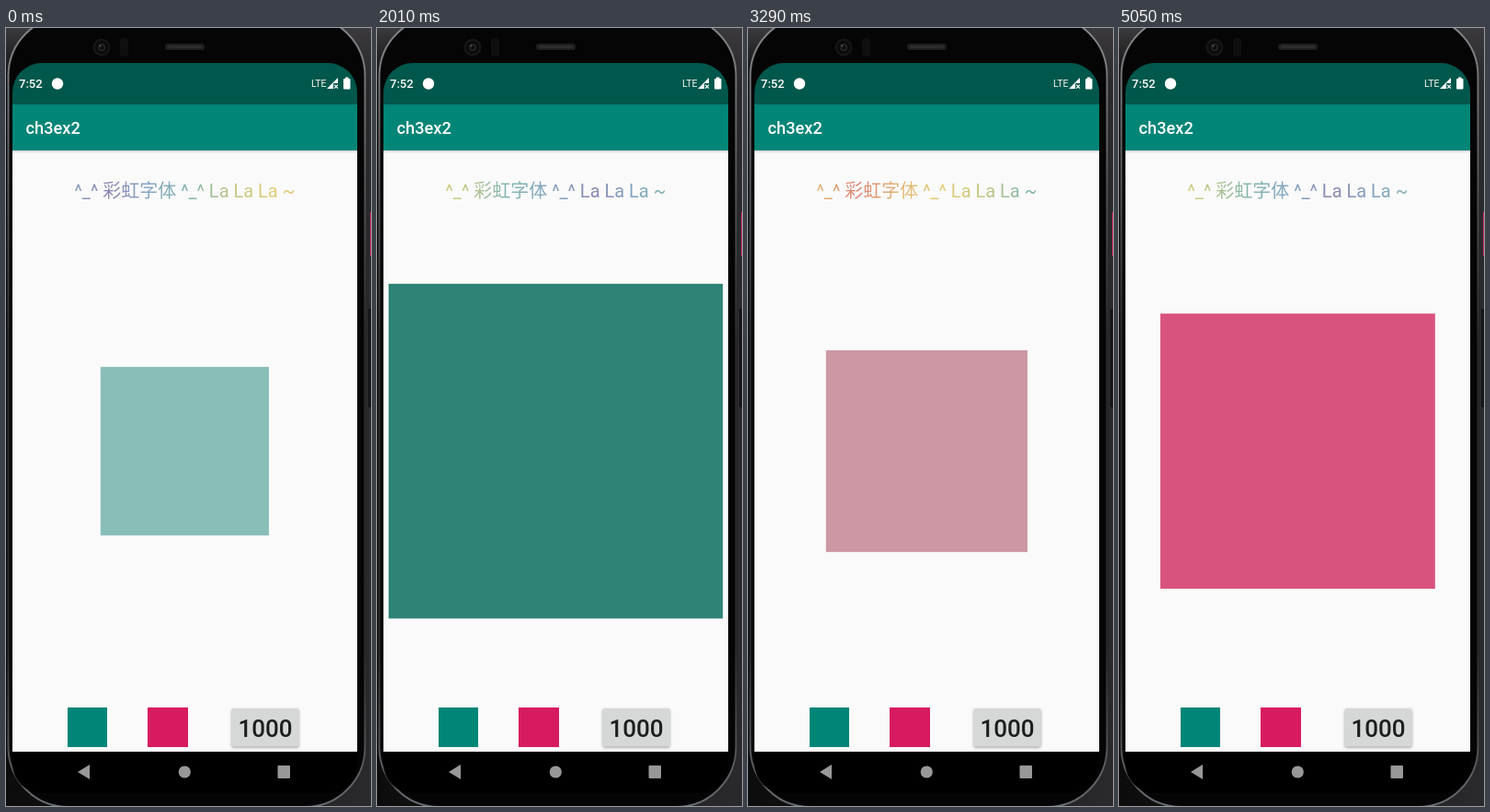
Write an HTML page with a canvas that moves like this. It is 397x845 px and loops after 5090 ms.

```html
<!DOCTYPE html>
<html lang="zh">
<head>
<meta charset="utf-8">
<title>ch3ex2</title>
<style>
html, body { margin: 0; width: 100%; height: 100%; overflow: hidden; background: #1c1b1c; }
canvas { display: block; width: 397px; height: 845px; }
</style>
</head>
<body>
<canvas id="stage" width="397" height="845"></canvas>
<script>
const W = 397, H = 845, LOOP = 5090, STEP = 40;
const GREEN = [0, 133, 119], PINK = [216, 27, 96];
const CENTER = { x: 194.4, y: 459.6 };
const BASE = 91.3;            // half side of the unscaled square
const BAND = 46;              // width of one rainbow colour
const RAINBOW = ['#8c87b2', '#82a4c0', '#82b6ae', '#c2c884', '#e2cc76', '#e4b674', '#de8474'];
const MIRROR = 2 * (RAINBOW.length - 1);

// time, pulse phase, rainbow offset
const KEYS = [
  [0, .033, 110], [800, .4385, 597], [1520, .802, 1033], [2000, 1.06, 1336],
  [2240, 1.176, 1471], [2680, 1.404, 1718], [3370, 1.75, 2102],
  [4080, 2.102, 2498], [5040, 2.588, 2992]
];

const stage = document.getElementById('stage').getContext('2d');
const rgb = c => `rgb(${c.map(Math.round).join(',')})`;
const ease = u => .5 - .5 * Math.cos(Math.PI * u);

function rect(c, color, x, y, w, h) {
  c.fillStyle = color;
  c.fillRect(x, y, w, h);
}

function round(c, color, x, y, w, h, r) {
  c.fillStyle = color;
  c.beginPath();
  c.roundRect(x, y, w, h, r);
  c.fill();
}

function disc(c, color, x, y, r) {
  c.fillStyle = color;
  c.beginPath();
  c.arc(x, y, r, 0, 7);
  c.fill();
}

function poly(c, color, ...pts) {
  c.fillStyle = color;
  c.beginPath();
  pts.forEach(([x, y]) => c.lineTo(x, y));
  c.fill();
}

function cross(c, color, x, y, r, width) {
  c.strokeStyle = color;
  c.lineWidth = width;
  c.beginPath();
  c.moveTo(x - r, y - r); c.lineTo(x + r, y + r);
  c.moveTo(x + r, y - r); c.lineTo(x - r, y + r);
  c.stroke();
}

function label(c, text, x, y, font, color) {
  c.font = font + ' Roboto, sans-serif';
  c.fillStyle = color;
  c.fillText(text, x, y);
}

function fade(c, x0, y0, x1, y1, ...colors) {
  const g = c.createLinearGradient(x0, y0, x1, y1);
  colors.forEach((color, i) => g.addColorStop(i / (colors.length - 1), color));
  return g;
}

function drawBody(c) {
  rect(c, fade(c, 0, 0, W, 0, '#0c0c0d', '#2a292b'), 0, 0, W, H);
  rect(c, fade(c, 0, 0, 0, 60, '#3b393b', 'rgba(59,57,59,0)'), 0, 0, W, 60);
  rect(c, '#141416', 394, 305, 3, 107);
  rect(c, '#cf2a63', 396, 200, 1, 48);
  round(c, '#050506', 1.5, -14, 390, 861, 66);
  c.lineWidth = 2;
  c.strokeStyle = fade(c, 0, 0, 0, H, '#85878a', '#56585b', '#2c2d2f', '#2c2d2f', '#2c2d2f', '#6a6c70');
  c.beginPath();
  c.roundRect(2.5, -13, 388, 859, 65);
  c.stroke();

  disc(c, '#161618', 104, 21, 9.5);
  disc(c, '#0a0a0b', 104, 21, 7);
  disc(c, '#29292b', 104, 21, 4);
  disc(c, '#0c0c0e', 104, 21, 2.5);
  disc(c, '#5c5c60', 102.5, 19.5, 1);
  round(c, '#0f0f10', 124, 11, 9, 20, 3);
  round(c, '#1f1f21', 173, 17, 43, 7, 3.5);
  round(c, '#2d2d2f', 176, 19, 37, 3, 1.5);
}

function drawStatus(c) {
  const bar = '#00574b';
  rect(c, bar, 7, 38, 375, 45);
  label(c, '7:52', 14, 65, '500 13px', '#fff');
  disc(c, '#fff', 56, 60.5, 6.2);
  label(c, 'LTE', 332, 64, '10.5px', '#eef4f3');
  poly(c, '#fff', [349, 66], [361, 54], [361, 66]);
  rect(c, bar, 356, 60, 6, 7);
  cross(c, '#fff', 359, 63.7, 2, 1.2);
  rect(c, '#fff', 369, 53.5, 3.5, 2);
  round(c, '#fff', 367, 55, 7.5, 11.5, 1);
}

function drawScreen(c) {
  c.save();
  c.beginPath();
  c.roundRect(7, 38, 375, 793, 32);
  c.clip();
  rect(c, '#fafafa', 7, 133, 375, 653);
  rect(c, '#000', 7, 786, 375, 45);
  drawStatus(c);
  rect(c, fade(c, 0, 133, 0, 136, 'rgba(0,0,0,.16)', 'rgba(0,0,0,0)'), 7, 133, 375, 3);
  rect(c, rgb(GREEN), 7, 83, 375, 50);
  label(c, 'ch3ex2', 21.5, 115, '500 18.2px', '#fff');

  rect(c, rgb(GREEN), 67, 738, 43, 43);
  rect(c, rgb(PINK), 154, 738, 44, 43);
  c.save();
  c.shadowColor = 'rgba(0,0,0,.35)';
  c.shadowBlur = 3;
  c.shadowOffsetY = 1.2;
  round(c, '#d6d7d7', 245.5, 739, 73, 41.5, 2);
  c.restore();
  c.textAlign = 'center';
  label(c, '1000', 282, 770, '500 26px', '#1c1d1d');

  const gray = '#989898';
  poly(c, gray, [78, 808], [91, 800], [91, 816]);
  disc(c, gray, 194.3, 808, 6.6);
  round(c, gray, 295.5, 801, 13.5, 14, 1);
  c.restore();
}

const backdrop = document.createElement('canvas');
backdrop.width = W;
backdrop.height = H;
drawBody(backdrop.getContext('2d'));
drawScreen(backdrop.getContext('2d'));

function pose(t) {
  let i = 1;
  while (i < KEYS.length - 1 && t > KEYS[i][0]) i++;
  const a = KEYS[i - 1], b = KEYS[i];
  const k = Math.min(1, (t - a[0]) / (b[0] - a[0]));
  return { phase: a[1] + (b[1] - a[1]) * k, shift: a[2] + (b[2] - a[2]) * k };
}

// Colours blend in linear light.
function blend(a, b, k) {
  return a.map((v, i) => (v ** 2.2 * (1 - k) + b[i] ** 2.2 * k) ** (1 / 2.2));
}

function drawSquare(phase) {
  const grow = ease(phase), half = BASE * (1 + grow);
  stage.globalAlpha = .5 + .5 * grow;
  rect(stage, rgb(blend(GREEN, PINK, ease(2 * phase))),
    CENTER.x - half, CENTER.y - half, 2 * half, 2 * half);
  stage.globalAlpha = 1;
}

function drawRainbow(shift) {
  const span = BAND * MIRROR, x = shift % span;
  const colors = Array.from({ length: 2 * MIRROR + 1 }, (_, i) => {
    const j = i % MIRROR;
    return RAINBOW[Math.min(j, MIRROR - j)];
  });
  stage.font = '20px Roboto, "Noto Sans CJK SC", "Noto Sans CJK", sans-serif';
  stage.textAlign = 'center';
  stage.fillStyle = fade(stage, x - span, 0, x + span, 0, ...colors);
  stage.fillText('^_^ 彩虹字体 ^_^ La La La ~', CENTER.x, 184);
}

function draw(now) {
  const t = Math.floor((now % LOOP) / STEP) * STEP;
  const { phase, shift } = pose(t);
  stage.drawImage(backdrop, 0, 0);
  drawSquare(phase);
  drawRainbow(shift);
}

const start = performance.now();
function tick() {
  draw(performance.now() - start);
  requestAnimationFrame(tick);
}
tick();
</script>
</body>
</html>
```
